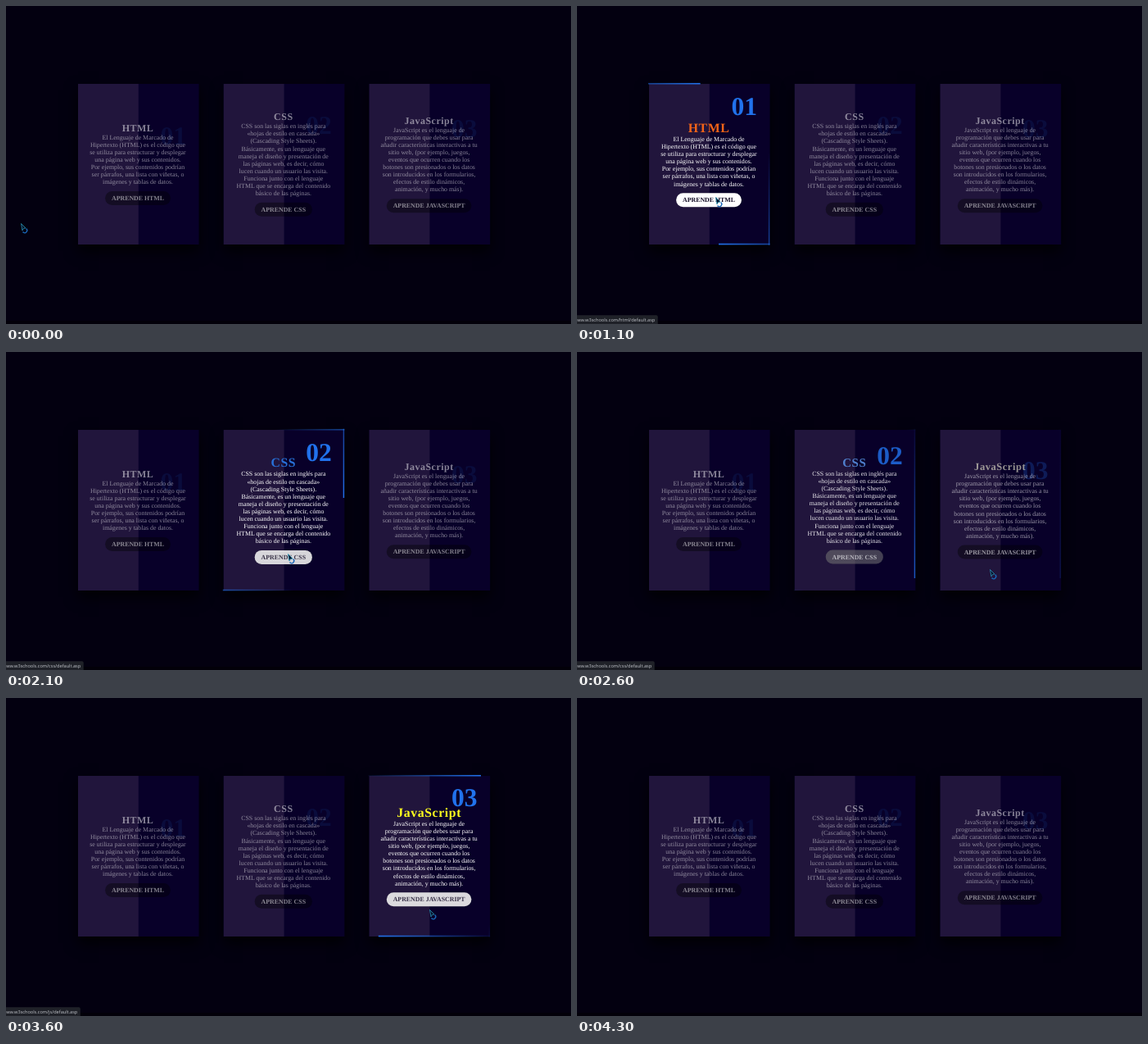
Recreate the animation shown at these times as an HTML page with a canvas. Size 690 by 388 pixels, loop 4500 ms.

```html
<!DOCTYPE html>
<html lang="es">
<head>
<meta charset="utf-8">
<title>Tarjetas</title>
<style>
  html, body { margin: 0; width: 100%; height: 100%; overflow: hidden; background: #030010; }
  canvas { display: block; width: 690px; height: 388px; }
</style>
</head>
<body>
<canvas id="stage"></canvas>
<script>
const W = 690, H = 388, LOOP = 4500, STEP = 100;
const EM = 7.88, LINE = 9.08, FADE = 470;
const CARD = { y: 95, w: 147.6, h: 196 };
const SERIF = '"Liberation Serif", "Times New Roman", serif';
const WHITE = [255, 255, 255], INK = [20, 13, 38], BLUE = '#2172ec';

const cards = [
  {
    x: 88, number: '01', title: 'HTML', color: [243, 100, 24], numberY: [158, 122.5],
    hover: [560, 1510], press: [750, 1430], pressLevel: 1,
    lines: ['El Lenguaje de Marcado de', 'Hipertexto (HTML) es el código que',
      'se utiliza para estructurar y desplegar', 'una página web y sus contenidos.',
      'Por ejemplo, sus contenidos podrían', 'ser párrafos, una lista con viñetas, o',
      'imágenes y tablas de datos.']
  },
  {
    x: 265.8, number: '02', title: 'CSS', color: [40, 112, 215], numberY: [145, 122],
    hover: [1510, 2500], press: [1850, 2375], pressLevel: 1,
    lines: ['CSS son las siglas en inglés para', '«hojas de estilo en cascada»',
      '(Cascading Style Sheets).', 'Básicamente, es un lenguaje que',
      'maneja el diseño y presentación de', 'las páginas web, es decir, cómo',
      'lucen cuando un usuario las visita.', 'Funciona junto con el lenguaje',
      'HTML que se encarga del contenido', 'básico de las páginas.']
  },
  {
    x: 443.6, number: '03', title: 'JavaScript', color: [255, 255, 30], numberY: [149, 121],
    hover: [2530, 3740], press: [2700, 3620], pressLevel: 0.85,
    lines: ['JavaScript es el lenguaje de', 'programación que debes usar para',
      'añadir características interactivas a tu', 'sitio web, (por ejemplo, juegos,',
      'eventos que ocurren cuando los', 'botones son presionados o los datos',
      'son introducidos en los formularios,', 'efectos de estilo dinámicos,',
      'animación, y mucho más).']
  }
];

// [from, to, folder]
const links = [[900, 1900, 'html'], [1900, 2800, 'css'], [2800, 3800, 'js']];

// [time, x, y] of the pointer tip
const path = [
  [100, 18, 265], [300, 50, 278], [500, 92, 284], [700, 150, 262], [1000, 169, 233],
  [1100, 169, 233], [1250, 185, 238], [1400, 225, 252], [1550, 285, 262], [1700, 336, 255],
  [1900, 342, 246], [2200, 345, 246], [2350, 380, 255], [2500, 442, 268], [2600, 504, 265],
  [2800, 514, 258], [3000, 519, 250], [3300, 520, 246], [3600, 517, 258], [3700, 518, 275],
  [3800, 516, 310], [4000, 512, 400]
];

const canvas = document.getElementById('stage');
const ctx = canvas.getContext('2d');
const ratio = window.devicePixelRatio || 1;
canvas.width = W * ratio;
canvas.height = H * ratio;

const mix = (a, b, k) => a + (b - a) * k;
const mixColor = (a, b, k) => `rgb(${a.map((v, i) => Math.round(mix(v, b[i], k)))})`;
const ramp = (t, start, length) => Math.min(1, Math.max(0, (t - start) / length));
const pulse = (t, [on, off], length) => ramp(t, on, length) - ramp(t, off, length);

function text(str, x, y, { size = EM, weight = 400, fill = '#fff', align = 'center', spacing = 0, family = SERIF }) {
  ctx.font = `${weight} ${size}px ${family}`;
  ctx.letterSpacing = spacing + 'px';
  ctx.textRendering = 'geometricPrecision';
  ctx.textAlign = align;
  ctx.fillStyle = fill;
  ctx.fillText(str, x, y);
  return ctx.measureText(str).width;
}

function pill(x, y, w, h, fill, alpha) {
  ctx.globalAlpha = alpha;
  ctx.fillStyle = fill;
  ctx.beginPath();
  ctx.roundRect(x, y, w, h, h / 2);
  ctx.fill();
}

// A bar with a fading tail that goes from (x0, y0) to (x1, y1)
function streak(x0, y0, x1, y1) {
  const g = ctx.createLinearGradient(x0, y0, x1, y1);
  g.addColorStop(0, 'rgba(33,114,236,0)');
  g.addColorStop(1, BLUE);
  ctx.strokeStyle = g;
  ctx.lineWidth = 1.6;
  ctx.beginPath();
  ctx.moveTo(x0, y0);
  ctx.lineTo(x1, y1);
  ctx.stroke();
}

function drawBorder(x, t, alpha) {
  const { y, w, h } = CARD;
  const phase = (t / 2000 + 0.662) % 1;
  const head = phase * 2, sideHead = ((phase + 0.5) % 1) * 2;
  ctx.save();
  ctx.beginPath();
  ctx.rect(x - 1, y - 1.2, w + 1, h + 2);
  ctx.clip();
  ctx.globalAlpha = alpha;
  streak(x + w * (head - 1), y - 0.4, x + w * head, y - 0.4);
  streak(x + w * (2 - head), y + h - 0.4, x + w * (1 - head), y + h - 0.4);
  streak(x + w - 0.9, y + h * (sideHead - 1), x + w - 0.9, y + h * sideHead);
  ctx.restore();
}

function drawCard(card, t) {
  const { x } = card, { y, w, h } = CARD;
  const on = pulse(t, card.hover, FADE);
  const press = card.pressLevel * pulse(t, card.press, 300);
  const alpha = mix(0.5, 1, on);
  const cx = x + w / 2 - 0.8;

  ctx.save();
  ctx.shadowColor = 'rgba(0,0,0,.85)';
  ctx.shadowBlur = 16 * ratio;
  ctx.shadowOffsetY = 8 * ratio;
  ctx.fillStyle = '#080029';
  ctx.fillRect(x, y, w, h);
  ctx.restore();
  ctx.fillStyle = '#21153c';
  ctx.fillRect(x, y, w / 2, h);

  if (on > 0) drawBorder(x, t, on);

  ctx.globalAlpha = mix(0.1, 1, on);
  text(card.number, x + w - 15.7, mix(...card.numberY, on) + 10.6,
    { size: 4 * EM, weight: 700, fill: BLUE, align: 'right' });

  const size = mix(12, 15.8, on), titleH = size * 1.149;
  const bodyH = card.lines.length * LINE;
  const top = 192.6 - (titleH + bodyH + 23.6) / 2;
  ctx.globalAlpha = alpha;
  text(card.title, cx, top + size * 0.891,
    { size, weight: 700, spacing: mix(0.5, 0.6, on), fill: mixColor(WHITE, card.color, on) });
  card.lines.forEach((line, i) => text(line, cx, top + titleH + i * LINE + 7, {}));

  const label = 'APRENDE ' + card.title.toUpperCase();
  const by = top + titleH + bodyH + 6.6;
  ctx.font = `700 ${EM}px ${SERIF}`;
  ctx.letterSpacing = '0px';
  const bw = ctx.measureText(label).width + 2 * EM;
  pill(cx - bw / 2, by, bw, 17, '#000', 0.4);
  pill(cx - bw / 2, by, bw, 17, '#fff', press);
  ctx.globalAlpha = alpha;
  text(label, cx, by + 11.1, { weight: 700, fill: mixColor(WHITE, INK, press) });
  ctx.globalAlpha = 1;
}

function drawStatus(t) {
  const link = links.find(([from, to]) => t >= from && t < to);
  if (!link) return;
  const url = `www.w3schools.com/${link[2]}/default.asp`;
  const font = { size: 5.6, family: '"Open Sans", sans-serif', align: 'left', fill: '#c3c6cc' };
  ctx.font = `400 ${font.size}px ${font.family}`;
  ctx.letterSpacing = '0px';
  const right = ctx.measureText(url).width - 4.2 + 3.5;
  ctx.fillStyle = '#1f2128';
  ctx.beginPath();
  ctx.roundRect(-4, 377.3, right + 4, 14, 2);
  ctx.fill();
  text(url, -4.2, 384.9, font);
}

function drawPointer(t) {
  if (t >= 4000) return;
  const next = path.findIndex(p => p[0] > t);
  const [t1, x1, y1] = path[next], [t0, x0, y0] = path[Math.max(0, next - 1)];
  const k = next ? (t - t0) / (t1 - t0) : 0;
  ctx.save();
  ctx.translate(mix(x0, x1, k), mix(y0, y1, k));
  ctx.lineWidth = 0.8;
  ctx.fillStyle = '#07132b';
  ctx.strokeStyle = '#2a93b4';
  ctx.beginPath();
  ctx.moveTo(0.5, 0.5);
  ctx.lineTo(6, 6);
  ctx.lineTo(3.4, 6.4);
  ctx.lineTo(2, 9);
  ctx.closePath();
  ctx.fill();
  ctx.stroke();
  ctx.lineWidth = 1.4;
  ctx.strokeStyle = '#1a66b8';
  ctx.beginPath();
  ctx.arc(4.8, 8.8, 2.9, -0.9, 2.5);
  ctx.stroke();
  ctx.restore();
}

function draw(t) {
  ctx.setTransform(ratio, 0, 0, ratio, 0, 0);
  ctx.fillStyle = '#030010';
  ctx.fillRect(0, 0, W, H);
  ctx.fillStyle = '#020009';
  ctx.fillRect(0, 384, W, 4);
  cards.forEach(card => drawCard(card, t));
  drawStatus(t);
  drawPointer(t);
}

const start = performance.now();
function tick() {
  const t = (performance.now() - start) % LOOP;
  draw(Math.floor(t / STEP) * STEP);
  requestAnimationFrame(tick);
}
tick();
</script>
</body>
</html>
```
